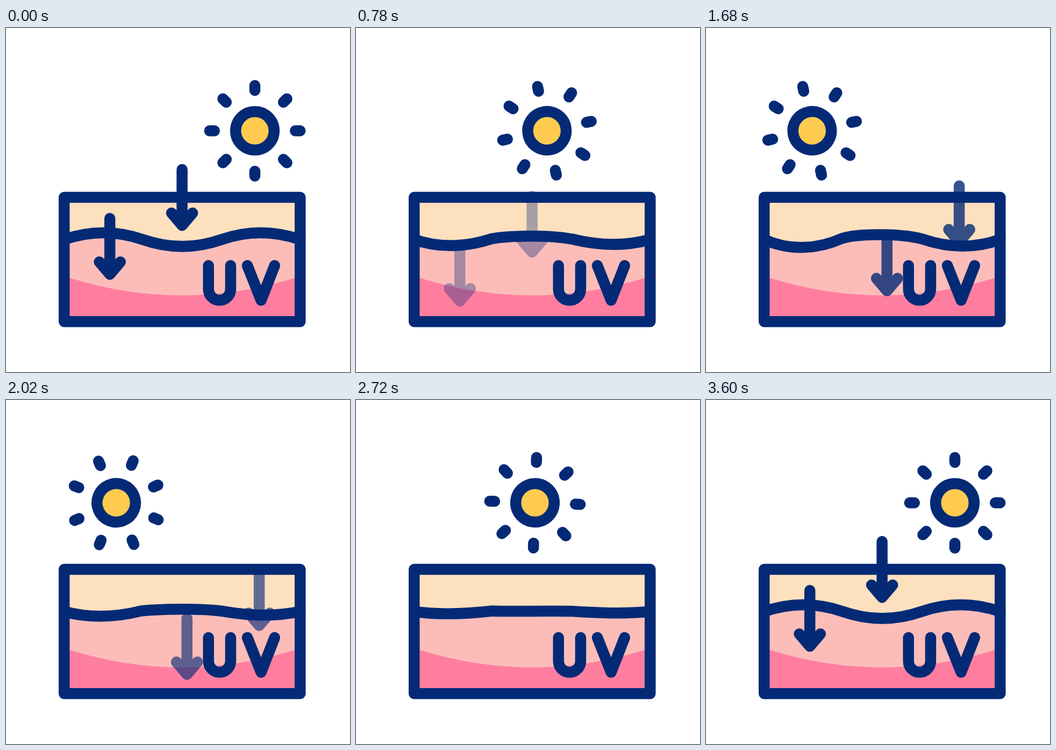
Animation of 640x640 px, one loop 3.62 s. Source, as an HTML page with a canvas:

```html
<!DOCTYPE html>
<html lang="en">
<head>
<meta charset="utf-8">
<title>UV rays and skin layers</title>
<style>
  html, body { margin: 0; width: 100%; height: 100%; overflow: hidden; background: #fff; }
  canvas { display: block; }
</style>
</head>
<body>
<canvas id="stage" width="640" height="640"></canvas>
<script>
const ctx = document.getElementById('stage').getContext('2d');
const LOOP = 3620, STEP = 20, CYCLE = 3600;
const NAVY = '#042a76', YELLOW = '#fecb50';
const PEACH = '#fde0be', PINK = '#fcbdb9', ROSE = '#ff7ea0';
const BOX = { x: 108.2, y: 315, w: 439.1, h: 231.2 };

// Cubic control points of the skin line in its two extreme poses.
const WAVE_UP = [
  [108.3, 393.5], [157.1, 376.8], [206, 376.8],
  [255, 393.7], [303.5, 410.6], [352, 410.6],
  [400.4, 393.7], [449, 376.8], [498, 376.8], [547.2, 393.5]
];
const WAVE_DOWN = [
  [108.3, 393.5], [158, 420.5], [211, 414.5],
  [252, 391.5], [272, 380.5], [356, 376.5],
  [403, 392.5], [447, 411.5], [496, 416], [547.2, 393.5]
];

const lerp = (a, b, k) => a + (b - a) * k;
const smooth = k => k * k * (3 - 2 * k);
// Eased 0 -> 1 -> 0 over one period.
const swing = (t, period) => smooth(1 - Math.abs(1 - 2 * (t % period) / period));

function polyline(points) {
  points.forEach(([x, y], i) => i ? ctx.lineTo(x, y) : ctx.moveTo(x, y));
}

function strokeLines(...lines) {
  ctx.beginPath();
  lines.forEach(polyline);
  ctx.stroke();
}

function traceWave(points) {
  ctx.beginPath();
  ctx.moveTo(...points[0]);
  for (let i = 1; i < points.length; i += 3) {
    ctx.bezierCurveTo(...points[i], ...points[i + 1], ...points[i + 2]);
  }
}

function drawSkin(t) {
  const { x, y, w, h } = BOX;
  const k = swing(t, 1200);
  const wave = WAVE_UP.map(([px, py], i) =>
    [lerp(px, WAVE_DOWN[i][0], k), lerp(py, WAVE_DOWN[i][1], k)]);

  ctx.fillStyle = PEACH;
  ctx.fillRect(x, y, w, h);

  traceWave(wave);
  ctx.lineTo(x + w, y + h);
  ctx.lineTo(x, y + h);
  ctx.fillStyle = PINK;
  ctx.fill();

  ctx.beginPath();
  ctx.moveTo(x, y + h);
  ctx.lineTo(x, 465);
  ctx.lineTo(118.5, 465);
  ctx.quadraticCurveTo(327.8, 530, 537, 465);
  ctx.lineTo(x + w, 465);
  ctx.lineTo(x + w, y + h);
  ctx.fillStyle = ROSE;
  ctx.fill();

  traceWave(wave);
  ctx.stroke();
  ctx.strokeRect(x, y, w, h);
}

function drawLetters() {
  ctx.beginPath();
  ctx.moveTo(376.7, 442);
  ctx.lineTo(376.7, 486);
  ctx.arc(397.3, 486, 20.6, Math.PI, 0, true);
  ctx.lineTo(417.9, 442);
  ctx.stroke();
  strokeLines([[449, 442], [474.6, 506.5], [499.8, 442]]);
}

function drawArrow(x, y, alpha) {
  ctx.globalAlpha = alpha;
  strokeLines(
    [[x, y], [x, y + 104]],
    [[x - 19.6, y + 81], [x, y + 104], [x + 19.6, y + 81]]
  );
  ctx.globalAlpha = 1;
}

function drawArrowPair(x, dy, alpha) {
  if (alpha <= 0) return;
  drawArrow(x, 354.2 + dy, alpha);
  drawArrow(x + 134.4, 263.2 + dy, alpha);
}

function drawArrows(t) {
  const fall = 76.5;
  if (t < 1200) {
    drawArrowPair(193.2, fall * t / 1200, 1 - t / 1200);
  } else if (t < 2400) {
    drawArrowPair(336.7, fall * (t - 1200) / 1200, 1 - Math.abs(t - 1800) / 600);
  } else if (t > 3000) {
    const k = (t - 3000) / 600;
    drawArrowPair(193.2, -64 * (1 - k), k);
  }
}

function drawSun(t) {
  ctx.save();
  ctx.translate(lerp(463, 194, swing(t, CYCLE)), 191.2);
  ctx.rotate(2 * Math.PI * t / CYCLE);
  ctx.beginPath();
  ctx.arc(0, 0, 35.8, 0, 2 * Math.PI);
  ctx.fillStyle = YELLOW;
  ctx.fill();
  ctx.stroke();
  for (let i = 0; i < 8; i++) {
    strokeLines([[75.2, 0], [84.2, 0]]);
    ctx.rotate(Math.PI / 4);
  }
  ctx.restore();
}

function draw(now) {
  const t = Math.floor((now % LOOP) / STEP) * STEP;
  ctx.fillStyle = '#fff';
  ctx.fillRect(0, 0, 640, 640);
  ctx.strokeStyle = NAVY;
  ctx.lineWidth = 20.5;
  ctx.lineCap = ctx.lineJoin = 'round';
  drawSkin(t);
  drawLetters();
  drawArrows(t);
  drawSun(t);
}

const start = performance.now();
function tick() {
  draw(performance.now() - start);
  requestAnimationFrame(tick);
}
tick();
</script>
</body>
</html>
```
